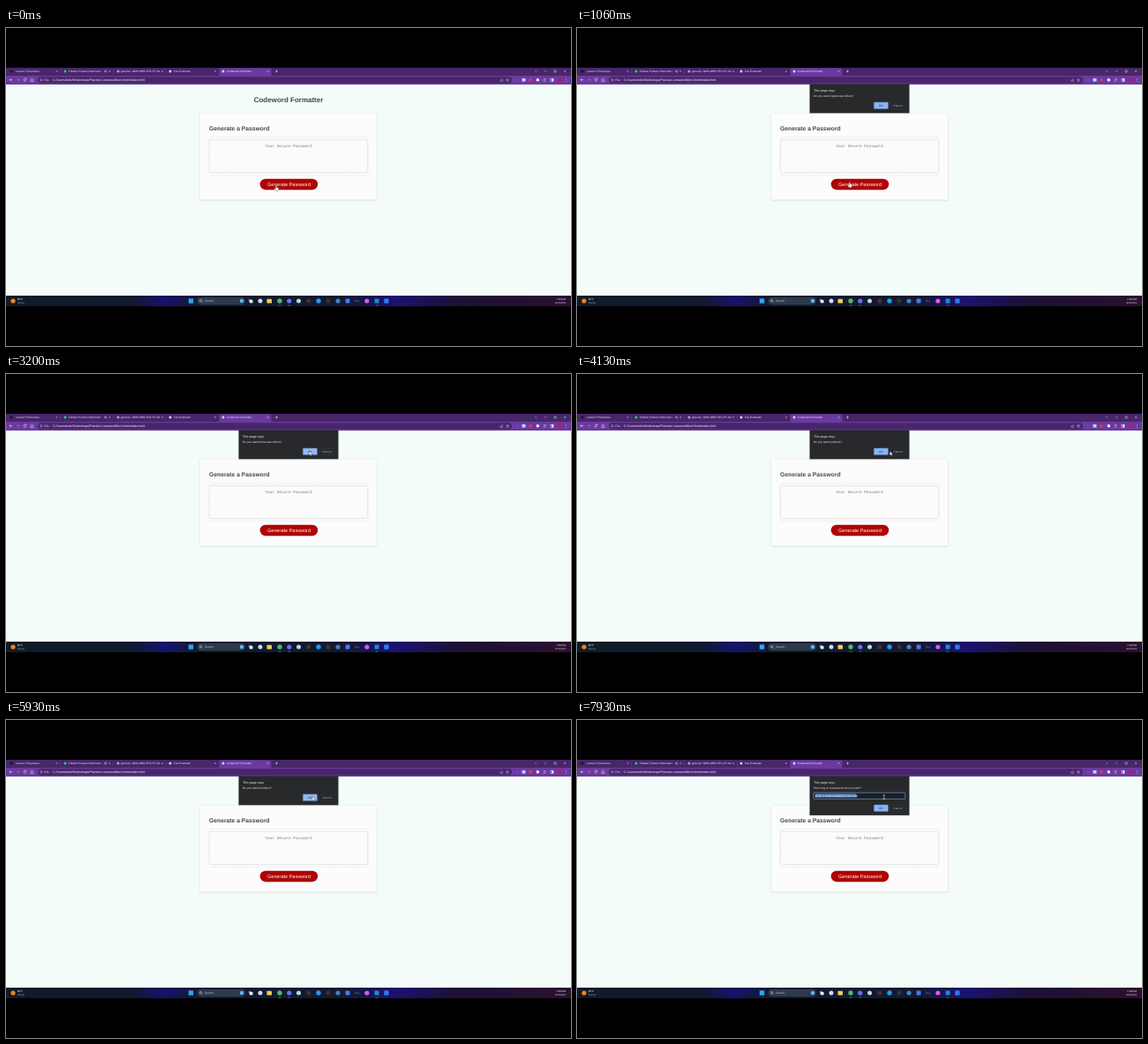
An HTML page for the animation above (8000 ms loop, 640 by 360 pixels).

```html
<!DOCTYPE html>
<html lang="en">
<head>
<meta charset="utf-8">
<title>Codeword Formatter</title>
<style>
  html, body { margin: 0; width: 100%; height: 100%; overflow: hidden; background: #000; }
  svg { display: block; width: 100vw; height: 100vh; }
  text { font-family: "Liberation Sans", Arial, sans-serif; text-rendering: geometricPrecision; white-space: pre; }
  .mono { font-family: "Liberation Mono", "DejaVu Sans Mono", monospace; }
  .bold { font-weight: bold; }
</style>
</head>
<body>
<svg id="stage" viewBox="0 0 640 360">
  <defs>
    <linearGradient id="bar">
      <stop stop-color="#0f1c27"/><stop offset=".22" stop-color="#10192f"/>
      <stop offset=".28" stop-color="#17126b"/><stop offset=".34" stop-color="#101b30"/>
      <stop offset=".6" stop-color="#111a30"/><stop offset=".69" stop-color="#1b1270"/>
      <stop offset=".8" stop-color="#1d1135"/><stop offset="1" stop-color="#2b1030"/>
    </linearGradient>
    <filter id="soft" x="-10%" y="-10%" width="120%" height="125%"><feGaussianBlur stdDeviation="1.1"/></filter>
  </defs>
  <rect width="640" height="360"/>
  <g id="browser"></g>
  <g id="page"></g>
  <g id="taskbar"></g>
  <g id="dialog">
    <rect id="panel" x="263.5" y="63.4" width="113" fill="#27292b"/>
    <g id="field"></g>
    <g id="buttons"></g>
  </g>
  <g id="cursor">
    <path id="hand" d="M-.6 0Q0-.7.6 0V2L2.5 2.6Q3 2.8 2.9 3.5L2.3 6H-.8L-2.3 3.6Q-2 2.8-1.2 3.5L-.6 4Z" fill="#fff" stroke="#222" stroke-width=".3"/>
    <path id="arrow" d="M0 0V5.2L1.2 4.1 2.1 6 2.9 5.6 2 3.8H3.7Z" fill="#fff" stroke="#111" stroke-width=".35"/>
    <path id="beam" d="M-1-2.3H1M0-2.3V2.5M-1 2.5H1" fill="none" stroke="#e8e8e8" stroke-width=".6"/>
  </g>
</svg>
<script>
const LOOP = 8000;
const $ = id => document.getElementById(id);

function add(parent, tag, attrs) {
  const el = document.createElementNS("http://www.w3.org/2000/svg", tag);
  for (const k in attrs) el.setAttribute(k, attrs[k]);
  return $(parent).appendChild(el);
}
const rect = (p, x, y, width, height, fill, more) => add(p, "rect", { x, y, width, height, fill, ...more });
const dot = (p, cx, cy, r, fill) => add(p, "circle", { cx, cy, r, fill });
const line = (p, d, stroke, width = .5, more) =>
  add(p, "path", { d, stroke, "stroke-width": width, fill: "none", ...more });
function label(p, x, y, size, fill, str, more) {
  const el = add(p, "text", { x, y, "font-size": size, fill, ...more });
  el.textContent = str;
  return el;
}
const middle = { "text-anchor": "middle" }, end = { "text-anchor": "end" };

function drawBrowser() {
  const b = "browser", pale = "#f6effb", purple = "#6b3a9f", dark = "#47266a";
  rect(b, 0, 45, 640, 10, dark);
  rect(b, 0, 54, 640, 10, purple);
  rect(b, 241.5, 45.5, 59, 9.5, purple, { rx: 2 });
  const tabs = [
    [6, 11, "Lesson 5 Exercises", "#16131c"],
    [67, 71, "Folded, Posted, Returned I", "#1ed760"],
    [127, 130, "general - NRB-WEB-TEC-PT-04-", "#a9a4cf"],
    [186, 190, "Fee Estimator", "#d8d0e0"],
    [246, 250, "Codeword Formatter", "#d8d0e0"]
  ];
  tabs.forEach(([ix, tx, str, color], i) => {
    dot(b, ix, 49, 1.5, color);
    label(b, tx, 50.2, 3.1, pale, str);
    const x = 57.5 + i * 59.8;
    line(b, `M${x - .8} 48.2l1.6 1.6m0-1.6l-1.6 1.6`, pale, .4);
    if (i < 3) line(b, `M${x + 4} 47v4.5`, "#7c5b96", .3);
  });
  line(b, "M111.5 48.4h1l1-.8v2.8l-1-.8h-1z", pale, .4);
  line(b, "M305 49h3M306.5 47.5v3", pale);
  line(b, "M599 48.4l1.2 1 1.2-1M610 49h2.4M621 47.9h2.2v2.2h-2.2zM632 47.9l2.2 2.2m0-2.2l-2.2 2.2", pale, .4);

  rect(b, 36, 55.2, 537, 7.4, dark, { rx: 3.7 });
  line(b, "M7.3 58.7H4m1.4-1.4L4 58.7l1.4 1.4", "#fff");
  line(b, "M12 58.7h3.3m-1.4-1.4l1.4 1.4-1.4 1.4", "#ad83c5");
  line(b, "M22.8 57.7a1.5 1.5 0 1 0 .2 1.5M23 56.8v1.2h-1.2", "#fff");
  line(b, "M27.6 58.7l1.9-1.6 1.9 1.6M28.2 58.5v2h2.6v-2", "#fff");
  add(b, "circle", { cx: 40, cy: 58.8, r: 1.2, fill: "none", stroke: pale, "stroke-width": .4 });
  label(b, 43.2, 60, 3.3, pale, "File");
  line(b, "M50.8 57.2v3.2", "#9a70b2", .3);
  label(b, 53, 60, 3.6, "#fff", "C:/Users/milo/Workshops/Practice-Lessons/Word-form/index.html");

  line(b, "M560 58.2v2h2.6v-1.2M561 58.8l2-1.6", pale, .4);
  line(b, "M568 57.2l.5 1.1 1.2.1-.9.8.3 1.2-1.1-.6-1.1.6.3-1.2-.9-.8 1.2-.1z", pale, .35);
  dot(b, 579, 58.8, 1.6, "#6947d8");
  rect(b, 584.5, 57, 4, 3.6, "#b9d2f5");
  dot(b, 594, 58.8, 1.8, "#e33b43");
  rect(b, 600.8, 57.3, 3, 3, "#fff", { rx: .6 });
  line(b, "M608.8 57.7h3M608.8 59h3M608.8 60.3h1.6", "#fff", .4);
  rect(b, 617, 57.3, 3, 3, "none", { stroke: "#fff", "stroke-width": .5 });
  rect(b, 618.5, 57.3, 1.5, 3, "#fff");
  dot(b, 627, 58.8, 2.2, "#c5154d");
  [57.3, 58.8, 60.3].forEach(y => dot(b, 634.5, y, .4, "#fff"));
}

function drawPage() {
  const p = "page", ink = "#3b4854";
  rect(p, 0, 64, 640, 239, "#f4fcfa");
  label(p, 320, 84, 8, ink, "Codeword Formatter", { ...middle, class: "bold" });
  rect(p, 220, 97.7, 200, 97.3, "#8e9899", { opacity: .4, filter: "url(#soft)" });
  rect(p, 220, 97, 200, 97.5, "#fcfcfc", { rx: 1.3 });
  label(p, 230, 116, 6.75, ink, "Generate a Password", { class: "bold" });
  line(p, "M230 123.5h180M230 166.5h180", "#dedfe0", .4);
  rect(p, 230.2, 126.3, 179.6, 37.4, "#fbfbfb", { rx: 1.2, stroke: "#a9abad", "stroke-width": .5, "stroke-dasharray": "1 .7" });
  label(p, 320, 135.2, 4.45, "#777", "Your Secure Password", { ...middle, class: "mono" });
  rect(p, 287.7, 170.7, 65.5, 12.5, "#ae0505", { rx: 6.25 });
  label(p, 320.5, 178.9, 5.55, "#fff", "Generate Password", middle);
}

function drawTaskbar() {
  const t = "taskbar";
  rect(t, 0, 303, 640, 12, "url(#bar)");
  dot(t, 8, 309, 2.6, "#f58220");
  label(t, 12.8, 308.2, 3, "#fff", "80°F");
  label(t, 12.8, 312, 2.9, "#aaa9b7", "Sunny");
  rect(t, 206.8, 306.3, 5.4, 5.4, "#2ba9e8");
  rect(t, 216.5, 304.8, 54.5, 8.4, "#2c3b4b", { rx: 4.2 });
  add(t, "circle", { cx: 220.6, cy: 308.6, r: 1.1, fill: "none", stroke: "#fff", "stroke-width": .5 });
  line(t, "M221.4 309.5l1 1", "#fff");
  label(t, 225, 310.2, 3.3, "#c3c6d1", "Search");
  dot(t, 267, 309, 2.2, "#5db9e8");
  rect(t, 274.8, 306.8, 3.5, 3.5, "#777b8e");
  rect(t, 276, 308, 3.5, 3.3, "#f2f2f2");
  dot(t, 288, 309, 2.5, "#d4d7f5");
  rect(t, 295.5, 306.8, 5.5, 4.7, "#f8cb54", { rx: .5 });
  dot(t, 310, 309, 2.7, "#52b765");
  dot(t, 320.8, 309, 2.6, "#6573ed");
  dot(t, 331.5, 309, 2.5, "#b9d6e7");
  rect(t, 340.5, 306.7, 4.6, 4.6, "#4b2d2e");
  dot(t, 354, 309, 2.7, "#239af0");
  rect(t, 362.7, 306.7, 4.6, 4.6, "#3a302d");
  dot(t, 376, 309, 2.6, "#3f83c3");
  rect(t, 384.5, 306.5, 5, 5, "#4c78ed", { rx: 1 });
  label(t, 397.5, 310, 3, "#8d8b9e", "Tiny", middle);
  dot(t, 408.8, 309, 2.6, "#d65af0");
  rect(t, 417.5, 306.5, 5, 5, "#2287dc");
  rect(t, 428.2, 306.3, 5.4, 5.4, "#2e78f0", { rx: 1.3 });
  line(t, "M308.5 314.2h3M319.5 314.2h2.6M418.7 314.2h2.6", "#a9a4be", .5);
  label(t, 634, 308.2, 2.95, "#fff", "7:39 PM", end);
  label(t, 634, 312.1, 2.75, "#e4dfe7", "9/11/2023", end);
}

drawBrowser();
drawPage();
drawTaskbar();

label("dialog", 268, 71.7, 3.6, "#f1f3f4", "This page says");
const message = label("dialog", 268, 78.3, 3.2, "#eceef0", "");
rect("field", 268, 82.2, 103.8, 7.2, "#1d2026", { rx: .8, stroke: "#7fa8e8", "stroke-width": .6 });
rect("field", 269.7, 83.5, 46.8, 4.2, "#5d83ba");
label("field", 270, 86.8, 3.05, "#f4f7fc", "Enter a number between 8 and 128");
const ok = rect("buttons", 336.3, 84, 16.2, 7.6, "#8ab4f8", { rx: .9, stroke: "#55749f", "stroke-width": .6 });
label("buttons", 344.4, 88.9, 3.2, "#202a3a", "OK", middle);
const cancel = rect("buttons", 355.2, 84.2, 16.6, 7.2, "#27292b", { rx: .9, stroke: "#3d4043", "stroke-width": .4 });
label("buttons", 363.5, 88.9, 3.2, "#9cc0fa", "Cancel", middle);

// start time of each question
const questions = [
  [860, "Do you want Uppercase letters?"],
  [2800, "Do you want lowercase letters?"],
  [3660, "Do you want symbols?"],
  [5200, "Do you want numbers?"],
  [6600, "How long of a password do you want?"]
];
// time, x, y of the pointer tip
const path = [
  [0, 306, 178.3], [500, 306, 178.3], [860, 308.8, 174.6], [1200, 308.8, 174.6],
  [1900, 344, 88.5], [2330, 344, 88.5], [2530, 343.5, 87], [3800, 343.5, 87],
  [4530, 368.5, 87.5], [5250, 368.5, 87.5], [5860, 347, 86.5],
  [6600, 347, 86.5], [7060, 347.8, 87.2], [LOOP, 347.8, 87.2]
];

function pointerAt(t) {
  const i = path.findIndex(k => k[0] > t), [t0, x0, y0] = path[i - 1], [t1, x1, y1] = path[i];
  const u = (t - t0) / (t1 - t0), e = u * u * (3 - 2 * u);
  return [x0 + (x1 - x0) * e, y0 + (y1 - y0) * e];
}
const show = (id, on) => $(id).setAttribute("display", on ? "inline" : "none");

function draw(now) {
  const t = now % LOOP;
  const asked = questions.filter(q => t >= q[0]);
  const prompt = asked.length === questions.length;
  const [x, y] = pointerAt(t);

  show("dialog", asked.length);
  show("field", prompt);
  message.textContent = asked.length ? asked[asked.length - 1][1] : "";
  $("panel").setAttribute("height", prompt ? 44.5 : 33);
  $("buttons").setAttribute("transform", `translate(0 ${prompt ? 12 : 0})`);

  const over = !prompt && y > 84 && y < 91.4;
  ok.setAttribute("fill", over && x > 336 && x < 352.5 ? "#94b9f5" : "#8ab4f8");
  cancel.setAttribute("fill", over && x > 355 && x < 372 ? "#30353c" : "#27292b");

  show("hand", t < 1250);
  show("arrow", t >= 1250 && !prompt);
  show("beam", prompt);
  $("cursor").setAttribute("transform", `translate(${x} ${y})`);
  requestAnimationFrame(draw);
}
draw(performance.now());
</script>
</body>
</html>
```
